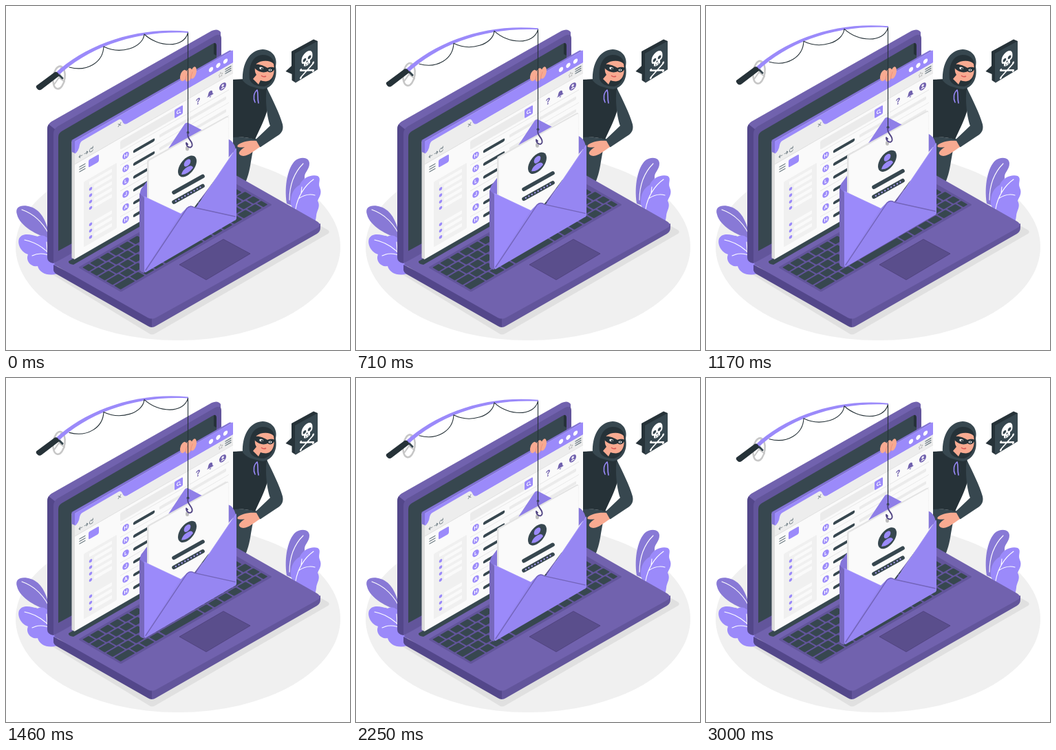
An HTML page that plays this animation: 500 px wide and 500 px high, repeating every 3040 ms.

```html
<!DOCTYPE html>
<html lang="en">
<head>
<meta charset="utf-8">
<title>Phishing</title>
<style>
  html, body { margin: 0; width: 100%; height: 100%; overflow: hidden; background: #fff; }
  svg { display: block; width: 100vw; height: 100vh; }
  .main { fill: #9b8afa; }
  .deep { fill: #7162ae; }
  .front { fill: #62559b; }
  .shade { fill: #53478a; }
  .dark { fill: #37474f; }
  .ink { fill: #263238; }
  .skin { fill: #f8aa91; }
  .vein, .thread, .bar, .ring { fill: none; stroke-linecap: round; stroke-linejoin: round; }
  .vein { stroke: #fff; stroke-width: 1.1; }
  .thread { stroke: #263238; stroke-width: 1.1; }
  .bar { stroke: #37474f; }
  text { font-family: Inter, Arial, sans-serif; font-weight: 700; text-anchor: middle; }
</style>
</head>
<body>
<svg viewBox="0 0 500 500">
  <ellipse cx="250" cy="350" rx="236" ry="136" fill="#f0f0f0"/>
  <path d="M67 390L208 476Q212 479 217 476L468 331Q472 328 467 325L440 310Z" fill="#e0e0e0"/>

  <!-- plants -->
  <g id="plants">
    <path d="M64 338C46 334 20 320 16 303C12 291 24 288 36 292C52 297 60 315 64 338Z" fill="#8879d6"/>
    <path class="vein" d="M62 331C53 314 40 302 23 296"/>
    <path class="main" d="M74 389C62 393 49 389 46 378C37 380 28 371 32 361C22 358 16 346 19 338C24 329 36 332 46 335C55 330 64 338 65 347C72 353 76 370 74 389Z"/>
    <path class="vein" d="M72 372C61 355 46 344 27 340M60 356L59 343M66 364C56 359 46 359 38 363"/>
    <path d="M408 287C404 260 410 235 420 225C429 218 441 220 441 229C441 238 433 242 434 250C432 266 423 278 418 291Z" fill="#8879d6"/>
    <path class="vein" d="M412 282C412 259 420 241 432 229"/>
    <path class="main" d="M414 288C413 273 419 264 427 260C431 249 445 244 453 247C459 251 453 257 456 264C460 272 455 278 453 283C458 292 451 298 451 305L449 317L420 302Z"/>
    <path class="vein" d="M421 295C424 277 434 261 447 252M429 272L430 263M425 280C434 274 442 273 449 275"/>
  </g>

  <!-- lid -->
  <path class="deep" d="M60 179Q60 172 66 168L299 36Q308 32 312 38L313 250L75 374Q60 373 60 365Z"/>
  <path class="shade" d="M60 179Q60 175 62 172L71 179L69 374Q60 373 60 365Z"/>
  <path class="front" d="M69 186Q69 179 75 175L304 43Q313 39 313 47V250L69 374Z"/>
  <path class="dark" d="M76 191Q76 185 81 182L300 55Q306 52 306 59V230L76 356Z"/>
  <path class="ink" d="M302 54Q306 53 306 59V72L302 70Z"/>

  <!-- thief -->
  <path class="dark" d="M329 189L364 193C359 206 358 216 356 226C354 240 351 250 347 259L329 250Z"/>
  <path class="ink" d="M329 107L348 106C358 117 370 120 379 118C383 130 382 142 379 154C374 170 367 182 362 194Q346 189 329 191Z"/>
  <path class="dark" d="M379 119C386 133 398 157 402 172C404 181 400 186 391 191L370 205C363 205 360 198 363 194L384 174C380 164 376 138 379 119Z"/>
  <path class="skin" d="M364 196C352 195 342 198 337 202C334 206 341 206 347 205C340 210 336 214 341 217C350 221 359 211 369 205Z"/>
  <path class="dark" d="M344 108C343 85 353 64 373 63C388 64 395 75 392 88C395 105 388 118 374 121C359 119 349 115 344 108Z"/>
  <path class="ink" d="M354 106C352 87 358 72 373 71C386 71 391 79 391 91C389 107 385 114 375 117C363 117 356 113 354 106Z"/>
  <path class="skin" d="M364 84C370 79 383 78 389 84C391 94 389 104 384 107C380 111 373 109 370 108L367 114L359 106L364 100C361 96 361 89 364 84Z"/>
  <path class="ink" d="M362 85C368 84 375 87 380 90C384 88 388 89 391 90C389 96 384 98 380 95C375 98 367 96 362 91Z"/>
  <ellipse cx="371" cy="90.500" rx="2.800" ry="1.700" fill="#fff" transform="rotate(12 371 90.500)"/>
  <ellipse cx="384" cy="93" rx="2.400" ry="1.500" fill="#fff"/>
  <circle class="ink" cx="372" cy="91" r="1.200"/><circle class="ink" cx="384" cy="93" r="1"/>
  <path d="M371 101Q374 104 378 102" fill="none" stroke="#d95a58" stroke-width="1.400"/>
  <path class="ring" d="M365 122C360 126 359 134 362 140M365 122C367 128 365 133 367 141" stroke="#9b8afa" stroke-width="1.600"/>

  <!-- speech bubble -->
  <path class="ink" d="M415 66L447 48.500L453 51V92L421 111.500L415.500 108V99L406.500 95L415 87Z"/>
  <path class="dark" d="M420 69L453 51V92L420 111.500Z"/>
  <g transform="matrix(1 -.577 0 1 437.500 77)" fill="#fff">
    <path d="M-8 -1C-8.500 -14 8.500 -14 8 -1Q8 4 4.500 4V8Q0 11 -4.500 8V4Q-8 4 -8 -1Z"/>
    <path d="M-9 11.500L9 21.500M-9 21.500L9 11.500" stroke="#fff" stroke-width="2.200" stroke-linecap="round"/>
    <g id="knobs"><circle cx="-9" cy="10.500" r="1.500"/><circle cx="9" cy="10.500" r="1.500"/><circle cx="-9" cy="22.500" r="1.500"/><circle cx="9" cy="22.500" r="1.500"/></g>
    <g class="dark"><circle cx="-3.600" cy="-.5" r="2.400"/><circle cx="3.600" cy="-.5" r="2.400"/><path d="M0 2L1.500 4.500H-1.500Z"/><path d="M-2 6h.8v3h-.8zM1.200 6h.8v3h-.8z"/></g>
  </g>

  <!-- base -->
  <path class="shade" d="M69 376V384Q70 388 74 390L206 465Q209 467 212 467V448Z"/>
  <path class="front" d="M212 454L457 316V322Q457 328 452 331L218 465Q215 467 212 467Z"/>
  <path class="deep" d="M72 373L313 234L452 313Q460 318 452 323L218 453Q212 456 206 453L72 377Q68 375 72 373Z"/>
  <path class="dark" d="M91 371L311 245L319 249L98 376Q90 375 91 371Z"/>
  <g id="keys" transform="matrix(1 -.577 1 .577 105 380)">
    <rect class="front" width="220" height="62" rx="2"/>
  </g>
  <path d="M252 376L316 339L355 360L291 398Z" fill="#5a4e8c" stroke="#493d75" stroke-width=".7"/>

  <!-- browser window -->
  <path d="M95.500 197L100 197V368.500L95.500 366Z" fill="#dcdcdc"/>
  <path d="M95.500 195L100 197V214L95.500 212Z" fill="#8273d5"/>
  <path d="M95.500 195L325 64.500L329.500 65L100 198Z" fill="#8273d5"/>
  <g id="page" transform="matrix(1 -.577 0 1 100 197)">
    <path d="M0 1Q0 0 1 0H228Q230 0 230 1V171H0Z" fill="#fafafa"/>
    <path class="main" d="M0 0H230V18H0Z"/>
    <path d="M0 18Q6 17 7 9Q8 5 11 5H64Q67 5 69 10Q71 17 76 18H230V33H0Z" fill="#ededed"/>
    <path d="M0 33H230" stroke="#dedede" stroke-width=".8"/>
    <g fill="#fff"><circle cx="198" cy="9.500" r="3.200"/><circle cx="208.500" cy="9.500" r="3.200"/><circle cx="219" cy="9.500" r="3.200"/></g>
    <g class="ring" stroke="#66757d" stroke-width=".8">
      <path d="M63 11L67 15M67 11L63 15M11 26H6M8 24L6 26L8 28M14 26H19M17 24L19 26L17 28M26 24A2.700 2.700 0 1 0 26.500 27M26.300 22V24.500H24"/>
      <path d="M219 21.500H227M219 24.500H227M219 27.500H227M7 41H15M7 44.500H15M7 48H15" stroke-width="1.300"/>
      <path d="M212 22L213 24L215 24.500L213.500 26L214 28L212 27L210 28L210.500 26L209 24.500L211 24Z" stroke="#aaa" stroke-width=".6"/>
    </g>
    <rect class="main" x="20" y="38.500" width="15" height="11" rx="2"/>
    <rect x="66" y="37.500" width="80" height="12.500" rx="2" fill="#ebebeb"/>
    <rect class="main" x="145" y="37.500" width="12" height="12.500" rx="1.500"/>
    <path class="ring" d="M153 43A2.300 2.300 0 1 0 152.700 45L154 47" stroke="#fff"/>
    <text x="179" y="49" font-size="12" fill="#7162ae">?</text>
    <path d="M192 47Q194 46 194 43Q194 40 197 40Q200 40 200 43Q200 46 202 47ZM195.500 48H198.500Q197 51 195.500 48Z" fill="#7162ae"/>
    <circle cx="215" cy="44" r="5" fill="#7162ae"/><circle cx="215" cy="42.500" r="1.700" fill="#fff"/><path d="M212 47Q215 43.500 218 47Z" fill="#fff"/>
    <rect x="13" y="66" width="48" height="95" rx="1.500" fill="#f0f0f0"/>
    <rect x="21" y="70.500" width="33" height="5" rx="1" fill="#fafafa"/>
  </g>
  <g class="skin">
    <ellipse cx="258" cy="101" rx="4.500" ry="8.500" transform="rotate(18 258 101)"/>
    <ellipse cx="265.500" cy="100" rx="4.800" ry="10" transform="rotate(14 265.500 100)"/>
    <ellipse cx="272.500" cy="97" rx="4" ry="9" transform="rotate(14 272.500 97)"/>
  </g>
  <path class="ring" d="M261 108Q261 102 264 98M268.500 106Q269 100 271 96" stroke="#e78878" stroke-width=".8"/>

  <g id="catch">
    <!-- envelope back and letter -->
    <path d="M236 207L260 171Q263 168 267 171L286 181L270 200Z" fill="#8f7fe8"/>
    <path d="M194 285Q194 267 198 264L207 252V279L201 292ZM322 193Q331 196 334 208L322 222Z" fill="#8576db"/>
    <path d="M205 226Q205 224 207 223L320 160.500Q323 159 323.500 162V225L262 306L205 284Z" fill="#e3e3e3"/>
    <path d="M207.500 227Q207.500 225.500 209 224.500L321 162Q323.500 161 323.500 163V226L262 308L207.500 284Z" fill="#fafafa"/>
    <ellipse cx="263.500" cy="207" rx="2.500" ry="3.500" fill="#bdbdbd"/>
    <g transform="matrix(1 -.577 0 1 263.500 233)">
      <circle class="dark" r="13.500"/>
      <circle class="main" cy="-5" r="4.800"/>
      <path class="main" d="M-8.500 7Q-7 1 0 1Q7 1 8.500 7Q0 13 -8.500 7Z"/>
    </g>
    <path class="bar" d="M244 271L286 247.500M244 285L286 261.500" stroke-width="5.600"/>
    <path d="M246 284L286 261.500" stroke="#b2a5fb" stroke-width="2" stroke-dasharray="2 3.100" fill="none"/>

    <!-- envelope front -->
    <path d="M194 272L201 279V388Q194 387 194 382Z" fill="#7768bd"/>
    <path d="M201 277L254 302L263 293Q268 288 274 293L277 292L334 207Q335 206 335 210V308Q335 311 332 312L205 386Q201 389 201 385Z" fill="#9686f2"/>
    <path class="main" d="M201 277L254 302L201 385Z"/>
    <path class="ring" d="M203 384L263 294Q268 289 274 293L333 306" stroke="#7364ba" stroke-width="1.400"/>
    <path class="ring" d="M201 277L254 302M277 292L334 208" stroke="#a99bfb" stroke-width=".7"/>

    <!-- rod, line and hook -->
    <g class="ring" stroke="#c7c7c7">
      <ellipse cx="77" cy="104" rx="8.500" ry="16.500" stroke-width="2.600" transform="rotate(8 77 104)"/>
      <path d="M77 104L80 90M77 104L70 114M77 104L85 110" stroke-width="2"/>
    </g>
    <path class="bar" d="M75 98L82 105" stroke-width="3"/>
    <path class="main" d="M71 98C118 55 190 30 265 37V39C190 35 121 59 75 102Z"/>
    <path class="ink" d="M44 116L71 96Q75 95 78 101L52 121Q48 124 45 120Q43 118 44 116Z"/>
    <path class="thread" d="M92 89C118 96 141 82 142 59C166 71 199 61 201 41C221 60 258 62 264.500 39V184"/>
    <circle class="dark" cx="264.500" cy="184" r="1.900"/>
    <path class="ring" d="M264.500 185C262 193 272 196 270.500 203C269 208 262 205 262 199L264 201" stroke="#4f4382" stroke-width="1.900"/>
  </g>
</svg>
<script>
const LOOP = 3040, LIFT = 10;
const byId = id => document.getElementById(id);

function add(parent, tag, attrs, text = "") {
  const el = document.createElementNS("http://www.w3.org/2000/svg", tag);
  for (const name in attrs) el.setAttribute(name, attrs[name]);
  el.textContent = text;
  parent.append(el);
}

function drawKeys(parent) {
  const key = (x, row, width) =>
    add(parent, "rect", { class: "dark", x, y: 3 + row * 11.5, width, height: 9.5, rx: 1 });
  for (let row = 0; row < 5; row++) {
    const first = 9 + row * 3;
    key(3, row, first);
    for (let x = first + 5; x < 215; x += 14.2) {
      if (row === 4 && x > 60 && x < 120) continue;
      key(x, row, Math.min(12, 217 - x));
    }
    if (row === 4) key(68.8, row, 54.6);
  }
}

function drawMail(parent) {
  [82, 91.3, 100.5, 109.8, 133.5, 142.7, 152].forEach(y => {
    add(parent, "circle", { class: "main", cx: 23, cy: y, r: 2.3 });
    add(parent, "rect", { x: 28, y: y - 2.5, width: 26, height: 5, rx: 1, fill: "#fafafa" });
  });
  [..."HNLJAH"].forEach((letter, i) => {
    const y = 63 + i * 18.7;
    add(parent, "path", { d: `M66 ${y - 9}H224`, stroke: "#e4e4e4", "stroke-width": 0.8 });
    add(parent, "circle", { class: "main", cx: 74, cy: y, r: 4.7 });
    add(parent, "text", { x: 74, y: y + 2.5, "font-size": 7, fill: "#fff" }, letter);
    add(parent, "path", { class: "bar", d: `M87 ${y + 1}H114`, "stroke-width": 4.4 });
    add(parent, "rect", { x: 123, y: y - 2, width: 97, height: 4.5, rx: 1, fill: "#ebebeb" });
  });
}

function render(now) {
  const phase = (now % LOOP) / LOOP;
  const rise = LIFT * (1 - Math.abs(1 - 2 * phase));
  byId("catch").setAttribute("transform", `translate(0 ${-rise})`);
}

drawKeys(byId("keys"));
drawMail(byId("page"));

const start = performance.now();
function tick() {
  render(performance.now() - start);
  requestAnimationFrame(tick);
}
tick();
</script>
</body>
</html>
```
